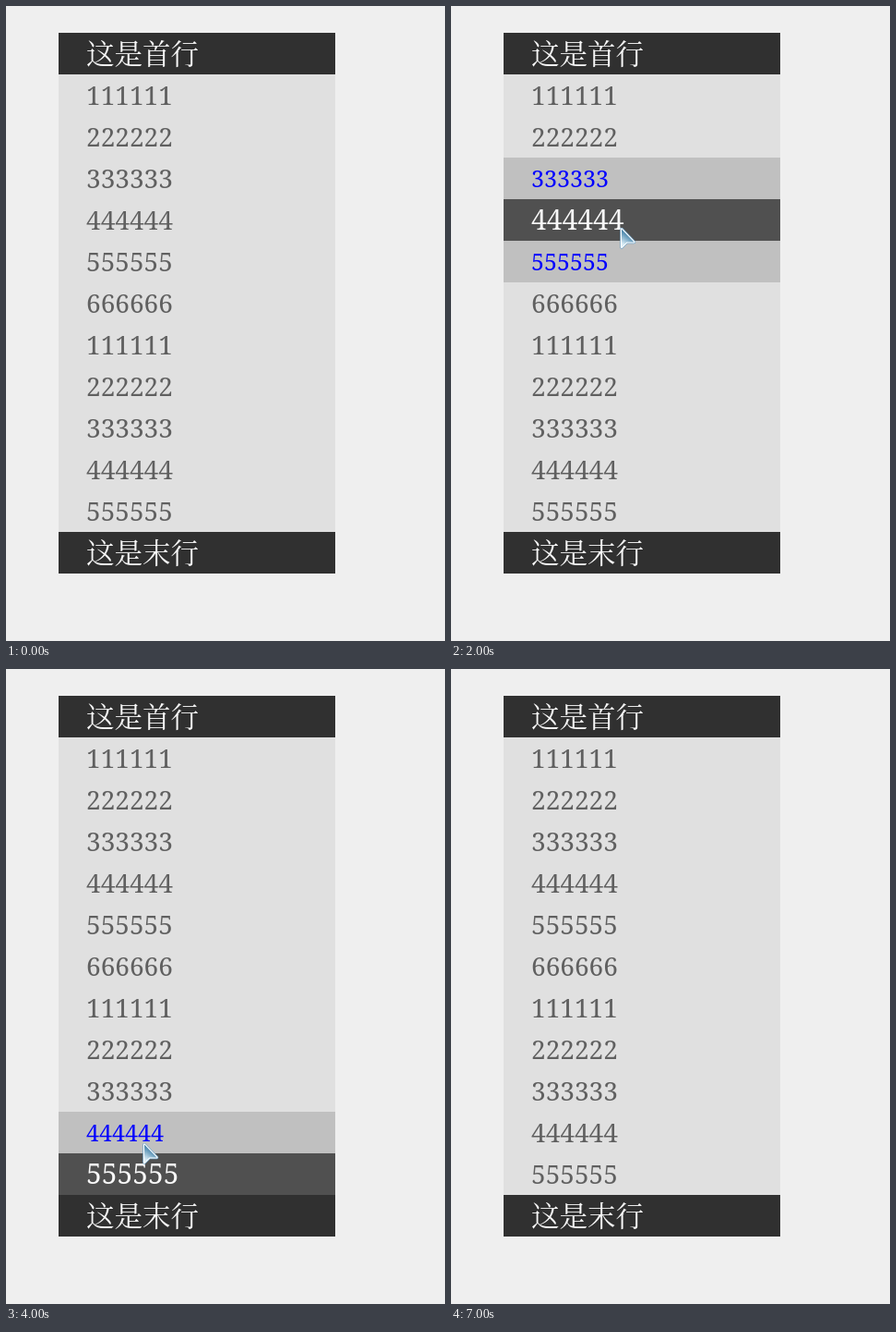
An HTML page with a canvas that plays this animation: 476 by 687 pixels, repeating every 7500 ms.

```html
<!DOCTYPE html>
<html lang="zh-CN">
<head>
<meta charset="utf-8">
<style>
  html, body { margin: 0; width: 100%; height: 100%; overflow: hidden; background: #efefef; }
  canvas { display: block; }
</style>
</head>
<body>
<canvas id="stage" width="476" height="687"></canvas>
<script>
const ctx = document.getElementById('stage').getContext('2d');
const LOOP = 7500;
const LEFT = 57, TOP = 29, WIDTH = 300, ROW = 45, LAST = 12;
const labels = ['这是首行', ...Array.from({ length: 11 }, (_, i) => String(i % 6 + 1).repeat(6)), '这是末行'];

// Each pose lasts until the next one: start time, hovered row, pointer tip.
const poses = [
  { at: 0, row: -1 },
  { at: 500, row: 0, x: 196, y: 50 },
  { at: 1500, row: 1, x: 212, y: 110 },
  { at: 2000, row: 4, x: 184, y: 240 },
  { at: 2500, row: 7, x: 156, y: 373 },
  { at: 3000, row: 9, x: 153, y: 465 },
  { at: 3500, row: 12, x: 150, y: 583 },
  { at: 4000, row: 11, x: 149, y: 513 },
  { at: 4500, row: 5, x: 170, y: 280 },
  { at: 5000, row: 0, x: 192, y: 50 },
  { at: 5500, row: 3, x: 192, y: 170 },
  { at: 6000, row: 5, x: 192, y: 280 },
  { at: 6500, row: 8, x: 190, y: 410 },
  { at: 7000, row: -1 }
];

const styles = {
  edge: { back: '#303030', ink: '#f8f8f8', size: 30.5, base: 34 },
  edgeHover: { back: '#f0a000', ink: '#606060', size: 30.5, base: 34 },
  normal: { back: '#e0e0e0', ink: '#606060', size: 28, base: 33 },
  hover: { back: '#505050', ink: '#f8f8f8', size: 30, base: 33 },
  near: { back: '#c0c0c0', ink: '#0000ff', size: 25, base: 32 }
};

function styleOf(row, hovered) {
  const isEdge = r => r === 0 || r === LAST;
  if (isEdge(row)) return row === hovered ? styles.edgeHover : styles.edge;
  if (row === hovered) return styles.hover;
  const isNear = hovered > 0 && !isEdge(hovered) && Math.abs(row - hovered) === 1;
  return isNear ? styles.near : styles.normal;
}

function drawRow(label, row, hovered) {
  const { back, ink, size, base } = styleOf(row, hovered);
  const y = TOP + row * ROW;
  ctx.fillStyle = back;
  ctx.fillRect(LEFT, y, WIDTH, ROW);
  ctx.fillStyle = ink;
  ctx.font = `${size}px "Noto Serif", "Noto Serif CJK SC", "Noto Sans CJK SC", serif`;
  ctx.fillText(label, LEFT + 30, y + base);
}

function drawPointer(x, y) {
  const arrow = new Path2D('M1 1.5V21L6.5 15.5H14.5Z');
  const shade = ctx.createLinearGradient(3, 18, 10, 8);
  shade.addColorStop(0, '#d8ecf6');
  shade.addColorStop(1, '#4180a8');
  ctx.save();
  ctx.translate(x, y);
  ctx.lineJoin = 'round';
  ctx.lineWidth = 3.5;
  ctx.strokeStyle = '#72a5c8';
  ctx.stroke(arrow);
  ctx.lineWidth = 2.2;
  ctx.strokeStyle = '#fff';
  ctx.stroke(arrow);
  ctx.fillStyle = shade;
  ctx.fill(arrow);
  ctx.restore();
}

function draw() {
  const time = performance.now() % LOOP;
  const pose = poses.findLast(p => p.at <= time);
  ctx.fillStyle = '#efefef';
  ctx.fillRect(0, 0, 476, 687);
  labels.forEach((label, row) => drawRow(label, row, pose.row));
  if (pose.row >= 0) drawPointer(pose.x, pose.y);
  requestAnimationFrame(draw);
}
draw();
</script>
</body>
</html>
```
